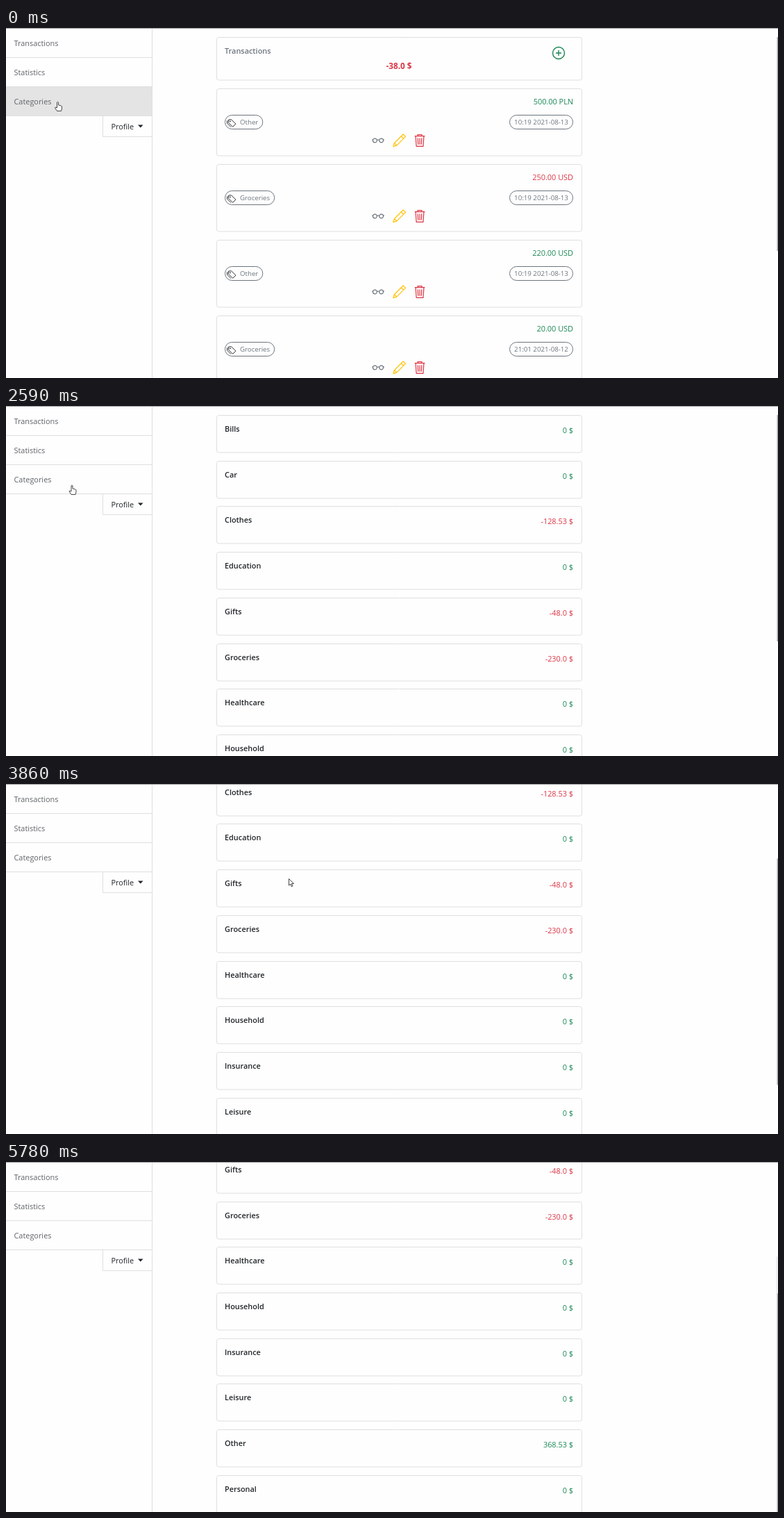
Animation, 1112 px wide and 504 px high, one loop 6910 ms. Source, as an HTML page with a canvas:

```html
<!DOCTYPE html>
<html lang="en">
<head>
<meta charset="utf-8">
<title>Budget categories</title>
<style>
  html, body { margin: 0; width: 100%; height: 100%; overflow: hidden; background: #fff; }
  canvas { display: block; }
</style>
</head>
<body>
<canvas id="stage" width="1112" height="504"></canvas>
<script>
const ctx = document.getElementById('stage').getContext('2d');
const LOOP = 6910, CATEGORIES_AT = 2590, POINTER_GONE_AT = 5780;
const GREEN = '#198754', RED = '#dc3545', GRAY = '#6c757d', DARK = '#212529', BORDER = '#dfdfdf';
const LEFT = 303, WIDTH = 526, PAD = 12, RIGHT = LEFT + WIDTH - PAD;
const SCROLL_END = 285;

const transactions = [
  { amount: '500.00 PLN', color: GREEN, category: 'Other', date: '10:19 2021-08-13' },
  { amount: '250.00 USD', color: RED, category: 'Groceries', date: '10:19 2021-08-13' },
  { amount: '220.00 USD', color: GREEN, category: 'Other', date: '10:19 2021-08-13' },
  { amount: '20.00 USD', color: GREEN, category: 'Groceries', date: '21:01 2021-08-12' },
];
const categories = ['Bills', 'Car', 'Clothes', 'Education', 'Gifts', 'Groceries',
  'Healthcare', 'Household', 'Insurance', 'Leisure', 'Other', 'Personal'];
const totals = { Clothes: '-128.53', Gifts: '-48.0', Groceries: '-230.0', Other: '368.53' };

// each move glides to (x, y); bow bends its middle downwards
const rest = { x: 74.5, y: 106 };
const moves = [
  { from: 330, to: 440, x: 79, y: 107 },
  { from: 540, to: 980, x: 91, y: 119, bow: 40 },
  { from: 1090, to: 1250, x: 95, y: 114 },
  { from: 2690, to: 2960, x: 402, y: 153 },
  { from: 3110, to: 3230, x: 407, y: 136 },
  { from: 4140, to: 4270, x: 282, y: 225 },
  { from: 4270, to: 4980, x: 885, y: 223, bow: 18 },
  { from: 5190, to: 5780, x: 1067, y: 490 },
];

const hand = new Path2D('M-1 6V1Q0-.5 1 1V5L5 6Q6 6.5 6 8V10L5 13.5H-1L-4 9Q-4 7-1 9Z');
const arrow = new Path2D('M.5 .5V10L3 8 4 11.5 6 11 4.5 7.5H7.5Z');

function ease(t, from, to) {
  const u = Math.min(1, Math.max(0, (t - from) / (to - from)));
  return u * u * (3 - 2 * u);
}

function text(label, x, y, color, { size = 10.9, weight = 400, align = 'left' } = {}) {
  ctx.font = `${weight} ${size}px "Open Sans", "Noto Sans", sans-serif`;
  ctx.textAlign = align;
  ctx.fillStyle = color;
  ctx.fillText(label, x, y);
}

function rect(x, y, w, h, color) {
  ctx.fillStyle = color;
  ctx.fillRect(x, y, w, h);
}

function box(x, y, w, h, radius, color = BORDER) {
  ctx.beginPath();
  ctx.roundRect(x + .5, y + .5, w, h, radius);
  ctx.strokeStyle = color;
  ctx.lineWidth = 1;
  ctx.stroke();
}

// icons are drawn around their centre on an 18px grid
const circle = (x, y, r) => {
  ctx.moveTo(x + r, y);
  ctx.arc(x, y, r, 0, 2 * Math.PI);
};
const line = (...points) => points.forEach(([x, y], i) => i ? ctx.lineTo(x, y) : ctx.moveTo(x, y));

const icons = {
  plus() {
    circle(0, 0, 8.5);
    line([0, -4], [0, 4]);
    line([-4, 0], [4, 0]);
  },
  glasses() {
    for (const side of [-1, 1]) {
      circle(side * 4.6, 0, 2.9);
      line([side * 7.3, -1], [side * 9, -1]);
    }
    line([-1.7, -.5], [0, -1], [1.7, -.5]);
  },
  pencil() {
    ctx.rotate(-Math.PI / 4);
    ctx.rect(-7, -2.4, 18, 4.8);
    line([-7, -2.4], [-11.5, 0], [-7, 2.4]);
    line([7, -2.4], [7, 2.4]);
  },
  trash() {
    line([-7.3, -6.3], [7.3, -6.3]);
    line([-3, -6.3], [-3, -8.4], [3, -8.4], [3, -6.3]);
    line([-5.9, -6.3], [-4.9, 8.4], [4.9, 8.4], [5.9, -6.3]);
    for (const side of [-1, 0, 1]) line([side * 2.8, -3.6], [side * 2.3, 5.8]);
  },
  tags() {
    ctx.rotate(Math.PI / 4);
    line([-5.5, 0], [-3, -3], [6, -3], [6, 3], [-3, 3], [-5.5, 0]);
    line([-6, 2.2], [-3.5, 5], [4.5, 5]);
    circle(-2.3, 0, .6);
  },
};

function icon(name, x, y, color, width = 1.2) {
  ctx.save();
  ctx.translate(x, y);
  ctx.beginPath();
  icons[name]();
  ctx.strokeStyle = color;
  ctx.lineWidth = width;
  ctx.lineJoin = 'round';
  ctx.stroke();
  ctx.restore();
}

function drawTransactions() {
  const center = LEFT + WIDTH / 2;
  box(LEFT, 13, WIDTH, 61.5, 3);
  text('Transactions', LEFT + PAD, 37, GRAY, { weight: 600 });
  text('-38.0 $', center, 58.5, RED, { size: 11.7, weight: 700, align: 'center' });
  icon('plus', 796, 36, GREEN, 1.4);

  transactions.forEach(({ amount, color, category, date }, i) => {
    const y = 87 + i * 109;
    box(LEFT, y, WIDTH, 96.5, 3);
    text(amount, RIGHT, y + 22.5, color, { align: 'right' });
    text(category, 337, y + 52.3, GRAY, { size: 9.7 });
    box(LEFT + PAD, y + 38, 28 + ctx.measureText(category).width, 20, 10, GRAY);
    icon('tags', 324.5, y + 49, DARK, .9);
    box(RIGHT - 92, y + 38, 91, 20, 10, GRAY);
    text(date, RIGHT - 46, y + 52.3, GRAY, { size: 9.7, align: 'center' });
    icon('glasses', center - 30, y + 75, GRAY);
    icon('pencil', center, y + 75.5, '#ffc107');
    icon('trash', center + 30, y + 75, RED);
  });
}

function drawCategories(scroll) {
  categories.forEach((name, i) => {
    const y = Math.round(13 + i * 65.7 - scroll);
    const total = totals[name] || '0';
    box(LEFT, y, WIDTH, 53.5, 3);
    text(name, LEFT + PAD, y + 24, DARK, { weight: 600 });
    text(total + ' $', RIGHT, y + 25.5, total[0] === '-' ? RED : GREEN, { align: 'right' });
  });
}

function drawSidebar(hovered) {
  if (hovered) rect(0, 84, 210, 42, '#e4e4e4');
  ['Transactions', 'Statistics', 'Categories'].forEach((name, i) => {
    const y = i * 41.8;
    rect(0, Math.round(42 + y), 210, 1, BORDER);
    text(name, 11.5, 26 + y, '#5f6367');
  });
  rect(210, 1, 1, 503, BORDER);
  box(139, 126, 71, 30, 0);
  text('Profile', 151.5, 146, DARK);
  ctx.beginPath();
  line([190, 139.5], [197.5, 139.5], [193.75, 143.5]);
  ctx.fill();
}

function drawScrollbar(onCategories, scroll) {
  const y = 13 + scroll * .618;
  if (scroll === SCROLL_END) rect(1109, y - 53, 3, 53, '#f0f0f0');
  rect(1110.5, y, 1.5, onCategories ? 326 : 308, '#a9a9a9');
}

function pointerAt(t) {
  let { x, y } = rest;
  for (const move of moves) {
    const k = ease(t, move.from, move.to);
    x += (move.x - x) * k;
    y += (move.y - y) * k + (move.bow || 0) * Math.sin(Math.PI * k);
  }
  return { x, y };
}

function drawPointer({ x, y }, overLink) {
  const shape = overLink ? hand : arrow;
  ctx.save();
  ctx.translate(x, y);
  ctx.fillStyle = '#fff';
  ctx.strokeStyle = '#333';
  ctx.lineWidth = .9;
  ctx.fill(shape);
  ctx.stroke(shape);
  ctx.restore();
}

function draw(t) {
  const onCategories = t >= CATEGORIES_AT;
  const scroll = SCROLL_END * ease(t, 3586, 4111);
  const pointer = pointerAt(t);
  const pointerShown = t < POINTER_GONE_AT;
  const overLink = pointer.x < 210 && pointer.y < 126;
  // a freshly loaded page shows no hover until the pointer moves
  const hovered = overLink && (!onCategories || t >= 2740);

  rect(0, 0, 1112, 504, '#fefefe');
  if (onCategories) drawCategories(scroll);
  else drawTransactions();
  drawSidebar(hovered);
  drawScrollbar(onCategories, scroll);
  rect(0, 0, 1112, 1, '#a0a0a0');
  if (pointerShown) drawPointer(pointer, overLink);
}

const start = performance.now();
function frame() {
  draw((performance.now() - start) % LOOP);
  requestAnimationFrame(frame);
}
frame();
</script>
</body>
</html>
```
